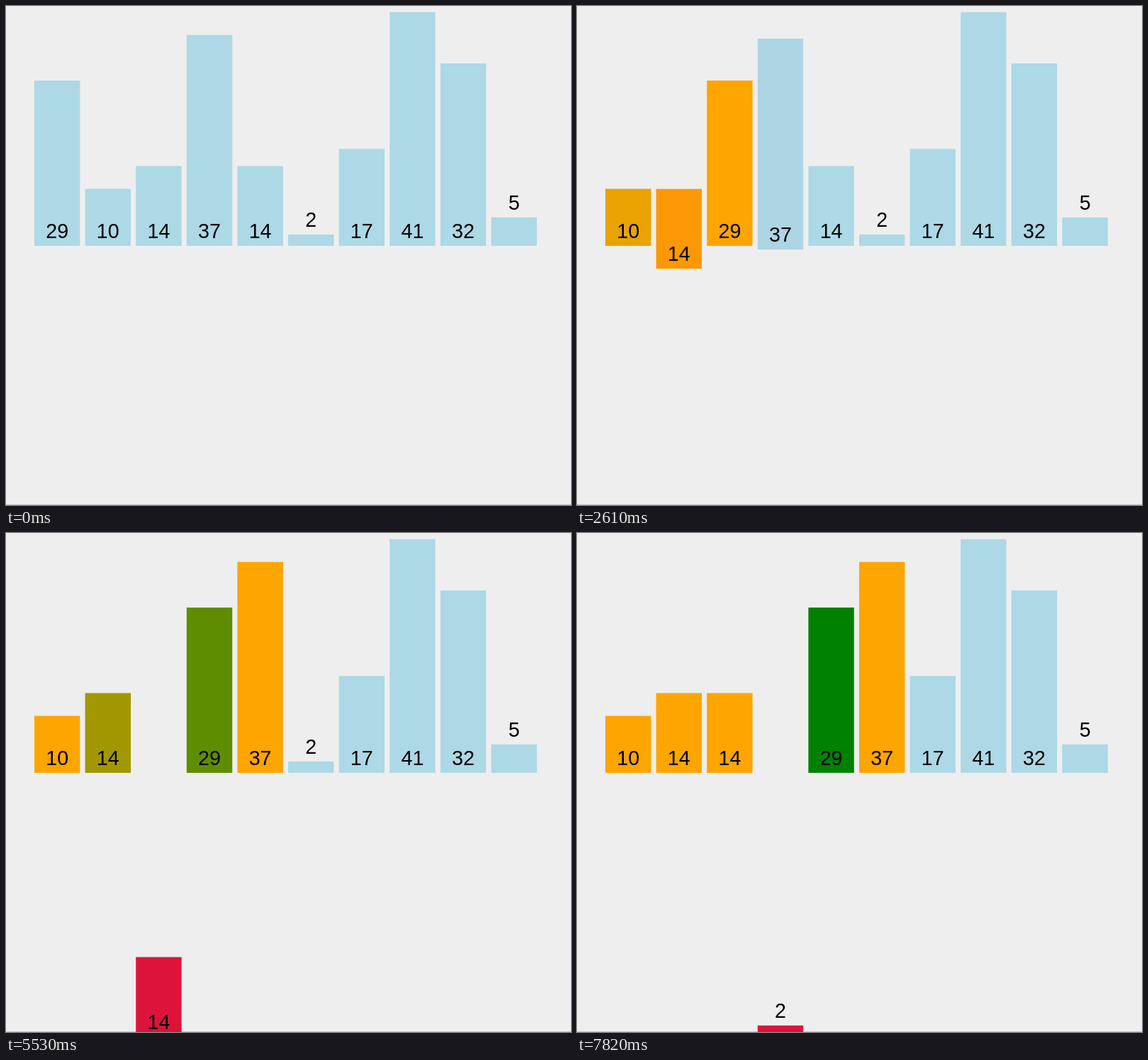
An HTML page for the animation above (8000 ms loop, 797 px wide and 703 px high).

```html
<!DOCTYPE html>
<html lang="en">
<head>
<meta charset="utf-8">
<title>Insertion sort</title>
<style>
  html, body { margin: 0; width: 100%; height: 100%; overflow: hidden; background: #eee; }
  svg { display: block; }
  text { font: 28.64px "Liberation Sans", Arial, sans-serif; text-anchor: middle; }
</style>
</head>
<body>
<svg id="stage" width="797" height="703" viewBox="0 0 797 703">
  <rect y="702" width="797" height="1" fill="#c4c4c4"/>
</svg>
<script>
const LOOP = 8000, DURATION = 250;
const LEFT = 40, PITCH = 71.6, WIDTH = 64.4, BASE = 337.9, UNIT = 8.03, DROP = 372, PAD = 11.2;
const BLUE = [173, 216, 230], ORANGE = [255, 165, 0], GREEN = [0, 128, 0], RED = [220, 20, 60];
const values = [29, 10, 14, 37, 14, 2, 17, 41, 32, 5];

// Start time of each sorting step.
const starts = [
  70, 248, 426, 603, 781, 959, 1137, 1530, 1930, 2392, 2572, 2840, 3290, 3683, 4085,
  4490, 4615, 4985, 5417, 5865, 6255, 6544, 6687, 7085, 7560
];

// Bursts of visible motion: first update, last update, number of updates.
const bursts = [
  [0, 0, 1], [80, 820, 10], [900, 1370, 7], [1600, 1840, 4], [2070, 2160, 2],
  [2520, 2610, 2], [2680, 3090, 7], [3320, 3550, 4], [3700, 3930, 4], [4240, 4310, 2],
  [4540, 4860, 5], [5010, 5250, 4], [5530, 5650, 3], [5880, 6120, 4], [6270, 6510, 4],
  [6660, 6960, 5], [7190, 7340, 3], [7580, 7820, 4]
];

// A pose holds [slot, drop, r, g, b] for every bar.
function sortPoses() {
  const bars = values.map((_, i) => ({ slot: i, drop: 0, color: BLUE }));
  const order = values.map((_, i) => i);
  const poses = [];
  const snap = () => poses.push(bars.map(b => [b.slot, b.drop, ...b.color]));

  snap();
  bars[0].color = ORANGE;
  snap();
  for (let i = 1; i < values.length; i++) {
    const key = order[i];
    let j = i, compared;
    Object.assign(bars[key], { color: RED, drop: DROP });
    snap();
    while (j > 0) {
      if (compared) compared.color = ORANGE;
      const other = order[j - 1];
      compared = bars[other];
      compared.color = GREEN;
      snap();
      if (values[other] <= values[key]) break;
      order[j] = other;
      order[j - 1] = key;
      compared.slot = j--;
      bars[key].slot = j;
      snap();
    }
    compared.color = ORANGE;
    Object.assign(bars[key], { color: ORANGE, drop: 0 });
    snap();
  }
  return poses;
}

const poses = sortPoses();
const ease = p => p < 0.5 ? 4 * p ** 3 : 1 - 4 * (1 - p) ** 3;
const mix = (from, to, k) => from.map((bar, i) => bar.map((v, n) => v + (to[i][n] - v) * k));

function shownTime(t) {
  const [first, last, count] = bursts.findLast(b => b[0] <= t);
  if (count === 1) return first;
  const gap = (last - first) / (count - 1);
  return first + gap * Math.min(count - 1, Math.floor((t - first) / gap + 1e-6));
}

// Each step takes over from wherever the previous one has got to.
function poseAt(t) {
  let pose = poses[0];
  starts.forEach((start, i) => {
    if (start >= t) return;
    const end = Math.min(t, starts[i + 1] ?? LOOP);
    pose = mix(pose, poses[i + 1], ease(Math.min(1, (end - start) / DURATION)));
  });
  return pose;
}

function add(parent, name, attrs) {
  const el = document.createElementNS("http://www.w3.org/2000/svg", name);
  for (const key in attrs) el.setAttribute(key, attrs[key]);
  return parent.appendChild(el);
}

const stage = document.getElementById("stage");
const views = values.map(value => {
  const group = add(stage, "g", {});
  const height = value * UNIT;
  const rect = add(group, "rect", { y: BASE - height, width: WIDTH, height });
  const foot = value < 10 ? BASE - height : BASE;
  add(group, "text", { x: WIDTH / 2, y: foot - PAD }).textContent = value;
  return { group, rect };
});

function draw() {
  const pose = poseAt(shownTime(performance.now() % LOOP));
  views.forEach(({ group, rect }, i) => {
    const [slot, drop, ...rgb] = pose[i];
    group.setAttribute("transform", `translate(${LEFT + slot * PITCH} ${drop})`);
    rect.setAttribute("fill", `rgb(${rgb.map(Math.round)})`);
  });
  requestAnimationFrame(draw);
}
draw();
</script>
</body>
</html>
```
